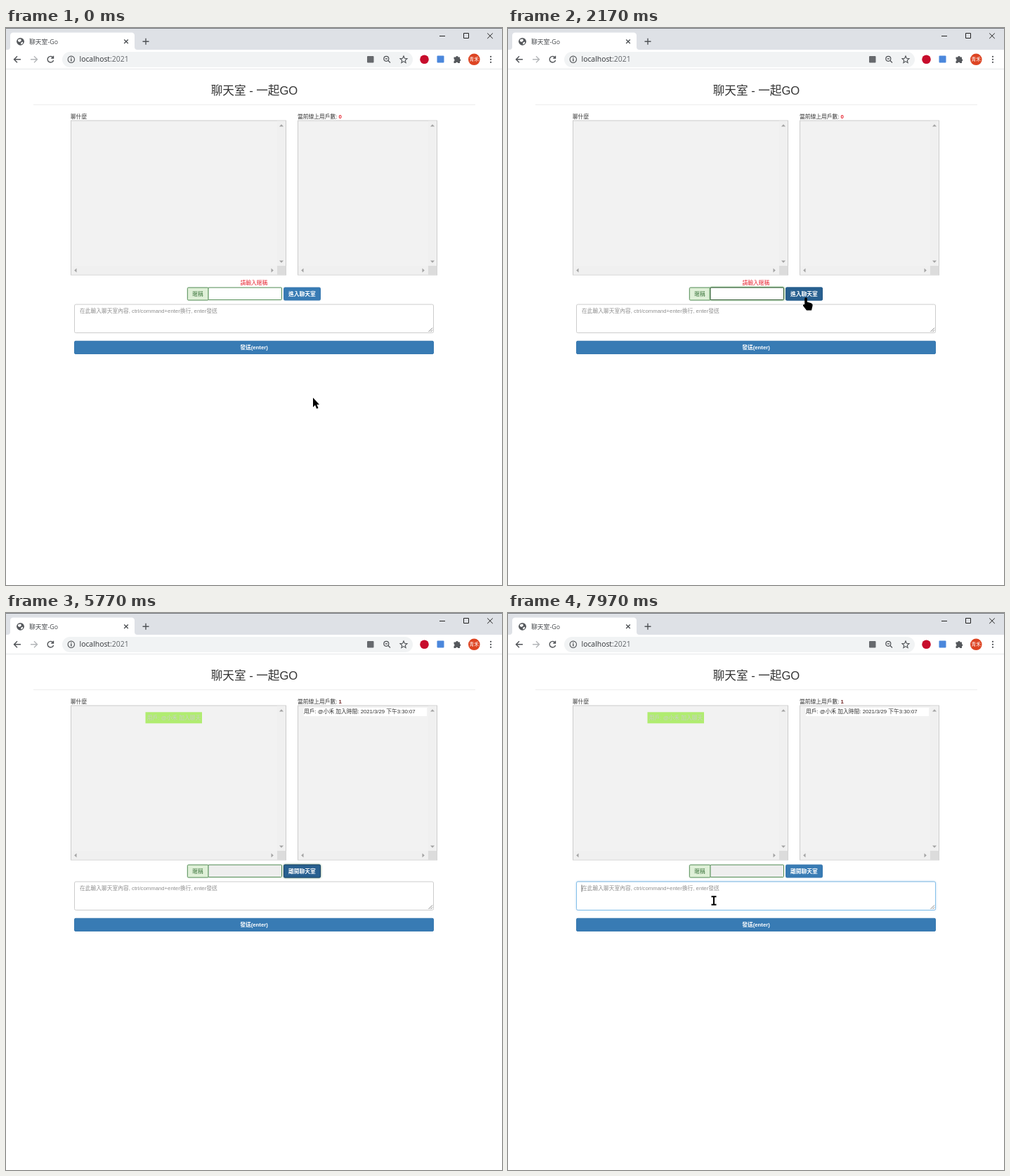
These frames come from a looping animation (706x794 px, 8 s). An HTML page:

```html
<!DOCTYPE html>
<html lang="zh-Hant">
<head>
<meta charset="utf-8">
<title>聊天室-Go</title>
<style>
html, body { margin: 0; width: 100%; height: 100%; overflow: hidden; background: #fff; }
svg { display: block; width: 706px; height: 794px; }
text { font: 7.75px "Liberation Sans", "Noto Sans CJK TC", "Noto Sans CJK JP", sans-serif; fill: #333; white-space: pre; }
.mid { text-anchor: middle; }
.btn { font-weight: bold; fill: #fff; text-anchor: middle; }
.ui { font-family: "Open Sans", "Noto Sans CJK TC", "Noto Sans CJK JP", sans-serif; }
.icon { fill: none; stroke: #505357; stroke-width: 1.4; }
.green { stroke: #4f8a50; }
.blue { fill: #387bb4; stroke: #3879b0; }
</style>
</head>
<body>
<svg viewBox="0 0 706 794">
  <defs>
    <path id="tri" d="M-3 1.5L0-1.8 3 1.5Z" fill="#a3a3a3"/>
  </defs>

  <!-- browser frame -->
  <rect id="titlebar" width="706" height="31"/>
  <path id="topEdge" d="M0 .5H706"/>
  <path d="M2 31Q6 31 6 27V11Q6 6.500 10.500 6.500H178.500Q183 6.500 183 11V27Q183 31 187 31Z" fill="#fff"/>
  <rect y="31" width="706" height="27.500" fill="#fff"/>
  <path d="M0 58.500H706" stroke="#e6e7e9"/>
  <circle cx="20.500" cy="19.300" r="5.400" fill="#55585c"/>
  <path d="M17 16.500L21 15.500 22 18 19.500 20 17 19ZM21 21L24 19.500 24 22 21.500 23.500Z" fill="#fff"/>
  <text class="ui" x="33" y="22.700" style="font-size:8.800px;fill:#45484c">聊天室-Go</text>
  <path class="icon" d="M168.200 16.500L173.800 22.100M173.800 16.500L168.200 22.100M194.500 19.300H203.500M199 14.800V23.800"/>
  <path id="controls" d="M617 11.500H625M651.500 7.500H658.500V14.500H651.500ZM685.200 7.500L692.800 15M692.800 7.500L685.200 15" fill="none"/>
  <path class="icon" d="M21 44.800H11.500M16 40.300L11.500 44.800 16 49.300"/>
  <path class="icon" d="M35 44.800H44.500M40 40.300L44.500 44.800 40 49.300" style="stroke:#b4b6b9"/>
  <path class="icon" d="M67 42.200A4.300 4.300 0 1 0 67.600 46M67.500 39.800V43H64.200"/>
  <rect x="80" y="34" width="499" height="22" rx="11" fill="#f1f3f4"/>
  <circle class="icon" cx="92.800" cy="44.800" r="4.700" style="stroke-width:1.100"/>
  <path class="icon" d="M92.800 44V47.500M92.800 42V43.200"/>
  <text class="ui" x="104.500" y="48.400" style="font-size:10.400px;fill:#303337">localhost<tspan fill="#606468">:2021</tspan></text>
  <rect x="514" y="40" width="9.500" height="9.500" rx="1" fill="#66696d"/>
  <circle class="icon" cx="541.300" cy="43.800" r="3.500" style="stroke-width:1.200"/>
  <path class="icon" d="M544 46.500L547 49.500M539.700 43.800H543" style="stroke-width:1.200"/>
  <path class="icon" d="M566 40L567.400 43.300 571 43.600 568.300 46 569.100 49.500 566 47.600 562.900 49.500 563.700 46 561 43.600 564.600 43.300Z" style="stroke-width:1.100"/>
  <circle cx="595.500" cy="44.800" r="6.300" fill="#c70d2c"/>
  <rect x="613.500" y="39.500" width="10" height="10" rx="1" fill="#4b87dc"/>
  <path d="M637.500 41.500H640.200A1.800 1.800 0 0 1 643.700 41.500H646V44.200A1.700 1.700 0 0 1 646 47.500V50H643.300A1.600 1.600 0 0 0 640.200 50H637.500V47.200A1.600 1.600 0 0 0 637.500 44.200Z" fill="#55585c"/>
  <circle cx="666.300" cy="44.800" r="8.300" fill="#dd4422"/>
  <text class="ui mid" x="666.300" y="47.400" style="font-size:6.800px;fill:#fff">青禾</text>
  <path d="M690 40.800h.01M690 44.800h.01M690 48.800h.01" stroke="#505357" stroke-width="2.300" stroke-linecap="round"/>

  <!-- page -->
  <text class="mid" x="353.500" y="94.500" style="font-size:16.600px;font-weight:300">聊天室 - 一起GO</text>
  <path d="M39 109.300H668" stroke="#ececec"/>
  <text x="92" y="128.700">聊什麼</text>
  <text x="415" y="128.700">當前線上用戶數: <tspan id="count" font-weight="bold">0</tspan></text>
  <g id="panels"></g>
  <g id="joined">
    <rect x="198.500" y="141.300" width="80.500" height="16" fill="#b0ec70"/>
    <text class="mid" x="239" y="151.800" style="font-size:7.750px;fill:#c9d0c6">用戶: @小禾 加入聊天</text>
    <rect x="424" y="135" width="175" height="12" fill="#fff"/>
    <text x="424" y="143.300">用戶: @小禾 加入時間: 2021/3/29 下午3:30:07</text>
  </g>
  <text id="hint" class="mid" x="353" y="366" style="fill:#e6202c">請輸入暱稱</text>

  <g id="form">
    <rect class="green" x="258.300" y="370" width="30" height="18" rx="1.500" fill="#dff0d8"/>
    <text class="mid" x="273" y="381.800" style="fill:#3c763d">暱稱</text>
    <rect id="nick" class="green" x="288" y="370" width="104.500" height="17.500" rx="1"/>
    <rect id="nickFocus" x="288" y="370" width="104.500" height="17.500" rx="1" fill="#fff" stroke="#2b542c" style="filter:drop-shadow(0 0 1.500px #67b168)"/>
    <text id="typed" x="295" y="381.800" style="fill:#555"></text>
    <path id="typedLine" stroke="#444" stroke-width=".7"/>
    <path id="nickCaret" stroke="#222" stroke-width=".9"/>
    <rect class="blue" x="395.500" y="370" width="52" height="18" rx="1.500"/>
    <rect id="enterHover" x="395.500" y="370" width="52" height="18" rx="1.500" fill="#286090" stroke="#265a86"/>
    <rect id="enterFocus" x="395.500" y="370" width="52" height="18" rx="1.500" fill="#286090" stroke="#1c4468" style="filter:drop-shadow(0 0 1.500px #6f9a72)"/>
    <text id="enterText" class="btn" x="421.500" y="381.800"></text>
    <rect x="97.500" y="394" width="511" height="40.500" rx="2" fill="#fff" stroke="#ccc"/>
    <rect id="areaFocus" x="97.500" y="394" width="511" height="40.500" rx="2" fill="#fff" stroke="#85c0ea" style="filter:drop-shadow(0 0 1.500px #66afe966)"/>
    <text x="105" y="406" style="fill:#8f8f8f">在此輸入聊天室內容, ctrl/command+enter換行, enter發送</text>
    <path id="areaCaret" d="M105 398.500V408.500" stroke="#444" stroke-width=".8"/>
    <path d="M601.500 433L607 427.500M604.500 433L607 430.500" stroke="#777" stroke-width=".9"/>
    <rect id="send" class="blue" x="97.500" y="446.300" width="511" height="18.200" rx="1.500"/>
    <text class="btn" x="353" y="458.300">發送(enter)</text>
  </g>
  <path id="cursor"/>
</svg>
<script>
const LOOP = 8000, FOCUS = 1670, JOIN = 4770, BLUR = 6370, RETURN = 7800;
const $ = id => document.getElementById(id);
const set = (id, attrs) => { for (const k in attrs) $(id).setAttribute(k, attrs[k]); };
const show = (id, on) => set(id, { opacity: on ? 1 : 0 });
const fade = (t, start, ms = 150) => Math.min(1, Math.max(0, (t - start) / ms));

// Scrolled panels share one layout
$('panels').innerHTML = [[92, 399], [415, 614]].map(([left, right]) => `
  <rect x="${left + .5}" y="132" width="${right - left - 1}" height="220" fill="#f2f2f2" stroke="#ccc"/>
  <path d="M${right - 13} 132.500H${right - 1}V339H${right - 13}ZM${left + 1} 339H${right - 13}V351.500H${left + 1}Z" fill="#f0f0f0"/>
  <rect x="${right - 13}" y="339" width="12.500" height="12.500" fill="#dcdcdc"/>` +
  [[right - 7, 139, 0], [right - 7, 333, 180], [left + 7, 345.5, -90], [right - 20, 345.5, 90]]
    .map(([x, y, a]) => `<use href="#tri" transform="translate(${x} ${y}) rotate(${a})"/>`).join('')).join('');

// Pointer track: time, x, y
const track = [
  [0, 437, 527], [30, 437, 527], [300, 400, 590], [600, 330, 628], [860, 275, 590],
  [1160, 243, 442], [1420, 270, 400], [1630, 335, 379], [1670, 335, 379], [2000, 424, 385],
  [4770, 424, 385], [5040, 431, 397], [5570, 470, 408], [5770, 575, 428],
  [7440, 700, 440], [7600, 520, 462], [7780, 293, 410], [8000, 293, 410]
];
const shapes = {
  arrow: { d: 'M0 0V13.500L3 10.600 5.200 15.700 7.500 14.700 5.400 9.700H9Z', fill: '#000', stroke: 'none' },
  hand: { d: 'M-1.800 1Q-1.800-1 0-1T1.800 1V5.500L7 7Q10 8 9.500 11L8 17.500H1L-4 11Q-4.500 8.500-1.800 9Z', fill: '#000', stroke: 'none' },
  text: { d: 'M-3.500-5.700H3.500M0-5.700V5.700M-3.500 5.700H3.500', fill: 'none', stroke: '#000', 'stroke-width': 2 }
};
// Nickname as composed with the input method
const typing = [
  [0, ''], [2400, 'ㄒ'], [2630, 'ㄒㄧ'], [2740, 'ㄒㄧㄠ'], [2870, '小'],
  [3400, '小ㄏ'], [3530, '小ㄏㄜ'], [3730, '小禾'], [JOIN, '']
];

function pointAt(t) {
  const i = Math.max(1, track.findIndex(k => k[0] > t));
  const [t0, x0, y0] = track[i - 1], [t1, x1, y1] = track[i];
  const p = (t - t0) / (t1 - t0);
  return [x0 + (x1 - x0) * p, y0 + (y1 - y0) * p];
}

function draw(t) {
  const joined = t >= JOIN, shift = joined ? -11 : 0;
  const active = t < BLUR || t >= RETURN;
  set('titlebar', { fill: active ? '#dee1e6' : '#e7eaee' });
  set('topEdge', { stroke: active ? '#75787d' : '#a6a8ab' });
  set('controls', { stroke: active ? '#222' : '#999' });
  set('form', { transform: `translate(0 ${shift})` });
  show('joined', joined);
  show('hint', !joined);
  $('count').textContent = +joined;
  set('count', { fill: joined ? '#702424' : '#e6202c' });
  $('enterText').textContent = joined ? '離開聊天室' : '進入聊天室';

  const [x, y] = pointAt(t);
  const visible = t < 5770 || t >= 7440;
  const inside = (l, r, top, bottom) => visible && x >= l && x <= r && y - shift >= top && y - shift <= bottom;
  const onEnter = inside(395, 448, 370, 388), onSend = inside(97, 609, 446, 465);
  const onText = inside(288, 393, 370, 388) || inside(97, 609, 394, 444);
  set('cursor', { ...shapes[onEnter || onSend ? 'hand' : onText ? 'text' : 'arrow'], transform: `translate(${x} ${y})` });
  show('cursor', visible);
  $('send').style.fill = onSend ? '#286090' : '';

  set('nick', { fill: joined ? '#eee' : '#fff' });
  set('nickFocus', { opacity: joined ? 0 : fade(t, FOCUS) });
  show('enterHover', onEnter);
  set('enterFocus', { opacity: joined ? 1 - fade(t, BLUR) : 0 });

  const [since, word] = typing.findLast(k => k[0] <= t);
  const end = 295 + word.length * 7.75;
  $('typed').textContent = word;
  set('typedLine', { d: `M295 384H${end}` });
  show('typedLine', word && t < 3830);
  set('nickCaret', { d: `M${end + .3} 374V384` });
  show('nickCaret', t >= FOCUS && !joined && (t - Math.max(FOCUS, since)) % 1000 < 500);

  set('areaFocus', { opacity: fade(t, RETURN) });
  show('areaCaret', t >= RETURN);
}

function tick() {
  draw(performance.now() % LOOP);
  requestAnimationFrame(tick);
}
tick();
</script>
</body>
</html>
```
